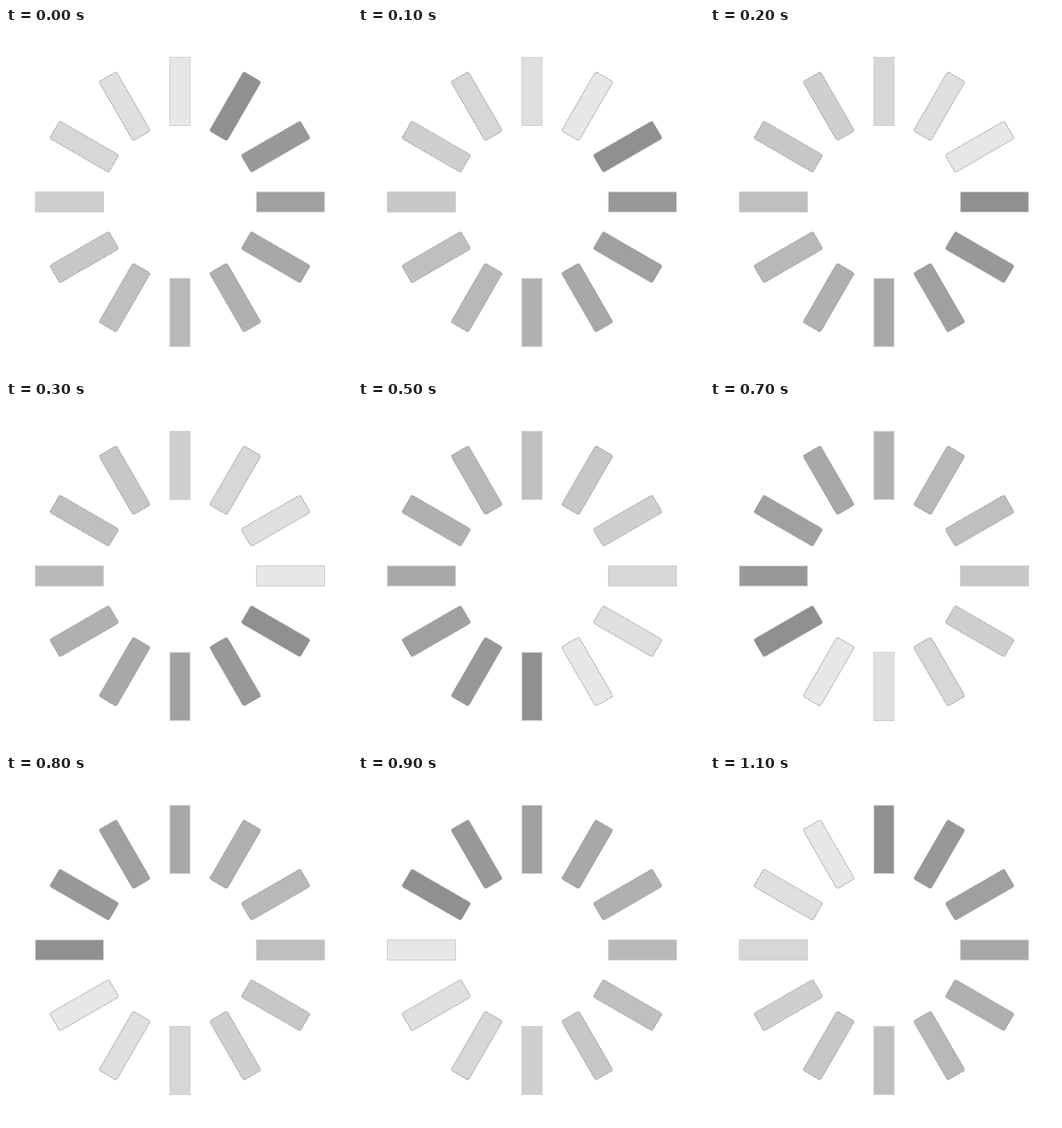
An HTML page that plays this animation: 360 px wide and 360 px high, repeating every 1200 ms.

```html
<!DOCTYPE html>
<html>
<head>
<meta charset="utf-8">
<style>
  html, body { margin: 0; width: 100%; height: 100%; overflow: hidden; background: #fff; }
  svg { display: block; }
</style>
</head>
<body>
<svg id="stage" width="360" height="360" viewBox="0 0 360 360"></svg>
<script>
const COUNT = 12, STEP = 100;
const stage = document.getElementById('stage');

function makeBar(i) {
  const bar = document.createElementNS('http://www.w3.org/2000/svg', 'rect');
  const upright = i % 3 === 0;
  const attrs = {
    x: 170.5, y: 30.5, width: 21, height: 71,
    transform: `rotate(${i * 360 / COUNT} 181 181)`,
    // Square bars have a pale solid edge, tilted ones a dark dotted edge
    ...(upright
      ? { stroke: '#d3d3d3', 'shape-rendering': 'crispEdges' }
      : { stroke: '#777', rx: 2, 'stroke-width': 0.8, 'stroke-dasharray': '1 1' })
  };
  for (const name in attrs) bar.setAttribute(name, attrs[name]);
  return stage.appendChild(bar);
}

const bars = Array.from({ length: COUNT }, (_, i) => makeBar(i));

function draw() {
  const step = Math.floor(performance.now() / STEP) % COUNT;
  bars.forEach((bar, i) => {
    const rank = (i - 1 - step + 2 * COUNT) % COUNT;
    const gray = Math.round(144 + rank * 87 / 11);
    bar.setAttribute('fill', `rgb(${gray},${gray},${gray})`);
  });
  requestAnimationFrame(draw);
}
draw();
</script>
</body>
</html>
```
